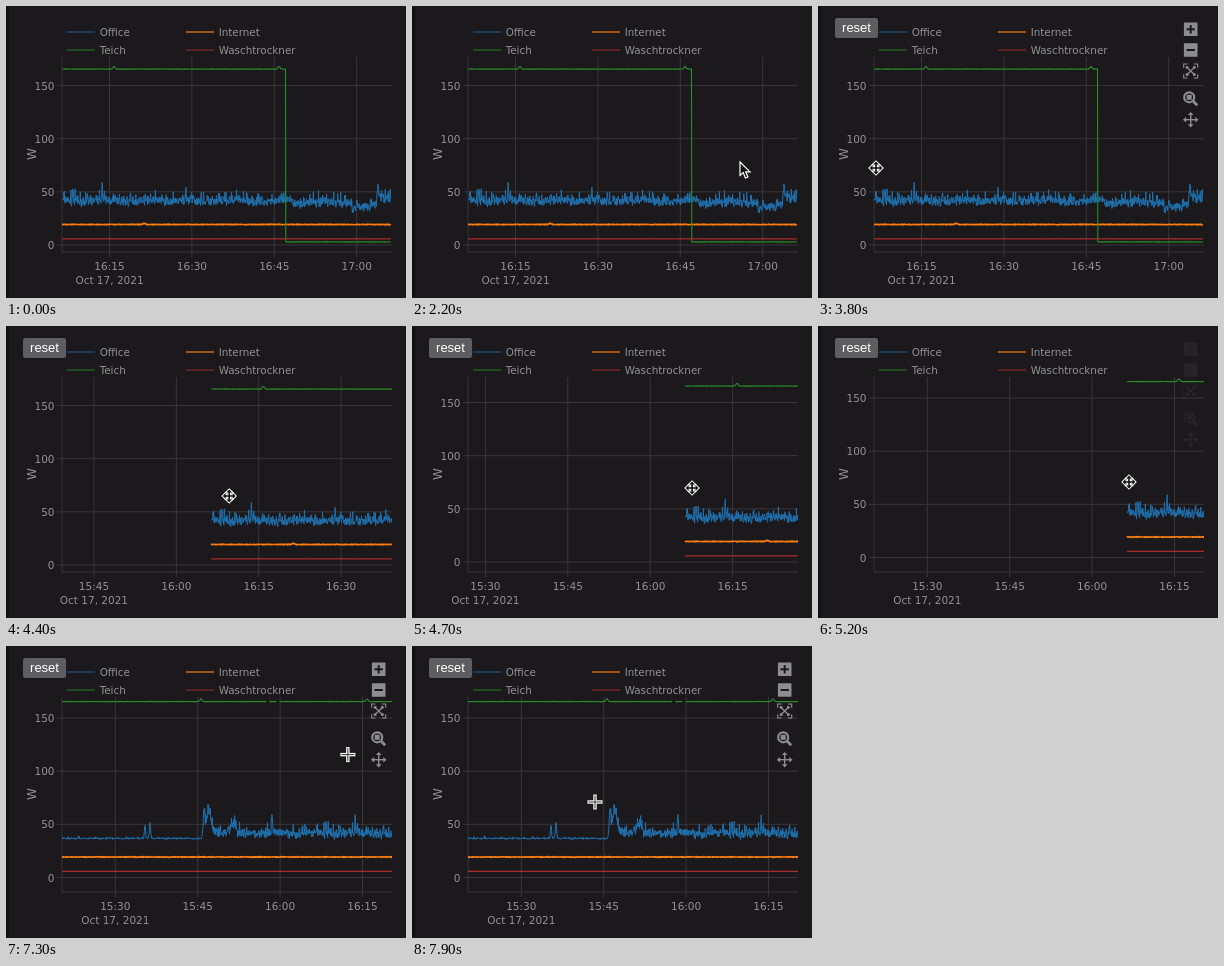
An HTML page with a canvas for the animation above (8 s loop, 400 by 292 pixels).

```html
<!DOCTYPE html>
<html lang="en">
<head>
<meta charset="utf-8">
<title>Power chart</title>
<style>
html, body { margin: 0; width: 100%; height: 100%; overflow: hidden; background: #1b191c; }
canvas { display: block; width: 400px; height: 292px; }
</style>
</head>
<body>
<canvas id="stage"></canvas>
<script>
const W = 400, H = 292, LOOP = 8000;
const BOX = { l: 56, t: 51, r: 386, b: 246 };
const FONT = '"DejaVu Sans", sans-serif';
const canvas = document.getElementById('stage');
const c = canvas.getContext('2d');
const dpr = window.devicePixelRatio || 1;
canvas.width = W * dpr;
canvas.height = H * dpr;

const PX_PER_W = 1.063, ZERO_Y = 239;
const QUARTER = 82.4, TICK_X = 103.5; // 16:15 sits at TICK_X before panning

// keys: [time, x, y]
const pointer = [
  [1100, 400, 190], [1500, 340, 165], [1800, 328, 156], [2250, 328, 156],
  [2550, 374, 111], [2900, 374, 111], [3500, 58, 162], [3850, 58, 162],
  [4150, 140, 167], [4400, 223, 170], [4700, 280, 162], [5050, 311, 156],
  [5700, 311, 156], [6250, 374, 99], [7200, 374, 99], [7800, 183, 156]
];
const drag = [[3900, 0, 0], [4150, 75, 2], [4400, 149, 0], [4700, 217, -3], [5100, 253, -7.5]];

function at(keys, t) {
  if (t <= keys[0][0]) return keys[0].slice(1);
  for (let i = 1; i < keys.length; i++) {
    const [t0, x0, y0] = keys[i - 1], [t1, x1, y1] = keys[i];
    if (t < t1) {
      const k = (t - t0) / (t1 - t0);
      return [x0 + (x1 - x0) * k, y0 + (y1 - y0) * k];
    }
  }
  return keys[keys.length - 1].slice(1);
}

const ramp = (t, from) => Math.min(1, Math.max(0, (t - from) / 300));

let seed = 7;
function rnd() {
  seed = (seed * 16807) % 2147483647;
  return seed / 2147483647;
}
const jitter = a => (rnd() + rnd() - 1) * a;

// [x, height, width]
const officePeaks = [
  [-114, 13, 0.8], [-109, 15, 0.9], [-55, 20, 1.3], [-50, 23, 3.2], [-26, 7, 3],
  [13, 17, 0.6], [67, 10, 0.6], [96, 14, 0.5], [180, 7, 0.7], [372, 9, 0.8]
];
const pondPeaks = [[-58, 2.5, 1.5], [108, 2.5, 1.5], [273, 2.5, 1.5]];
const peaks = (list, x) =>
  list.reduce((sum, [p, h, w]) => sum + h * Math.exp(-(((x - p) / w) ** 2)), 0);

function office(x) {
  const bump = peaks(officePeaks, x);
  if (x < -56) return 36.8 + bump + jitter(1.2) + (rnd() > 0.97 ? 1.5 : 0);
  let v = 41.5 + bump + jitter(5.5) + 0.8 * Math.sin(x / 7);
  if (rnd() > 0.85) v += 8 * rnd();
  if (x > 285) v -= 1.5;
  if (x > 346 && x < 369) v -= 4.5;
  if (x > 371) v += 4.5;
  return v;
}

function pond(x) {
  if ((x > 7.5 && x < 10.5) || (x > 17.5 && x < 20.5)) return null;
  return x < 279.7 ? 165.5 + peaks(pondPeaks, x) + jitter(0.3) : 2.9 + jitter(0.3);
}

const series = [
  { name: 'Office', color: '#1f70ad', width: 1, value: office, lx: 61, ly: 26 },
  { name: 'Internet', color: '#f97d10', width: 1.5, value: x => 19.3 + jitter(0.5) + peaks([[138, 1, 2]], x), lx: 180, ly: 26 },
  { name: 'Teich', color: '#298c29', width: 1.1, value: pond, lx: 61, ly: 44 },
  { name: 'Waschtrockner', color: '#a82c2d', width: 1.2, value: () => 5.8 + jitter(0.1), lx: 180, ly: 44 }
];

function trace(value, from, to) {
  const path = new Path2D();
  let pen = false;
  for (let x = from; x <= to; x += 0.3) {
    const v = value(x);
    if (v !== null) path[pen ? 'lineTo' : 'moveTo'](x, ZERO_Y - v * PX_PER_W);
    pen = v !== null;
  }
  return path;
}
for (const s of series) {
  s.recent = trace(s.value, 56, 385);
  s.older = trace(s.value, -198, 56.2);
}

function line(x0, y0, x1, y1, color, width = 1) {
  c.strokeStyle = color;
  c.lineWidth = width;
  c.beginPath();
  c.moveTo(x0, y0);
  c.lineTo(x1, y1);
  c.stroke();
}

function text(str, x, y, align = 'left', size = 10.5, color = '#929194', family = FONT) {
  c.font = `${size}px ${family}`;
  c.textAlign = align;
  c.fillStyle = color;
  c.fillText(str, x, y);
}

function panel(x, y, w, h, color, radius = 2.5) {
  c.fillStyle = color;
  c.beginPath();
  c.roundRect(x, y, w, h, radius);
  c.fill();
}

function drawAxes(dx, dy) {
  const grid = '#373538';
  for (let v = 0; v <= 150; v += 50) {
    const y = ZERO_Y - v * PX_PER_W + dy;
    line(51, y, BOX.r, y, grid);
    text(v, 48.5, y + 4, 'right');
  }
  let first = true;
  for (let i = -4; i <= 3; i++) {
    const x = TICK_X + i * QUARTER + dx;
    if (x < BOX.l || x > BOX.r) continue;
    const min = 975 + i * 15;
    line(x, BOX.t, x, BOX.b + 5, grid);
    text(Math.floor(min / 60) + ':' + String(min % 60).padStart(2, '0'), x, 264, 'center');
    if (first) text('Oct 17, 2021', x, 277.5, 'center');
    first = false;
  }
  line(BOX.l, BOX.t, BOX.l, BOX.b, grid);
  line(BOX.l, BOX.b, BOX.r, BOX.b, grid);
  c.save();
  c.translate(29.5, 148);
  c.rotate(-Math.PI / 2);
  text('W', 0, 0, 'center', 12);
  c.restore();
}

function drawTraces(dx, dy, loaded) {
  c.save();
  c.beginPath();
  c.rect(BOX.l, BOX.t, BOX.r - BOX.l, BOX.b - BOX.t);
  c.clip();
  c.translate(dx, dy);
  c.lineJoin = 'round';
  for (const s of series) {
    c.strokeStyle = s.color;
    c.lineWidth = s.width;
    if (loaded) c.stroke(s.older);
    c.stroke(s.recent);
  }
  c.restore();
}

function drawLegend() {
  for (const s of series) {
    c.globalAlpha = 0.8;
    line(s.lx, s.ly, s.lx + 28, s.ly, s.color, s.width);
    c.globalAlpha = 1;
    text(s.name, s.lx + 32.7, s.ly + 4, 'left', 10.35);
  }
}

const corners = [[-1, -1], [1, -1], [1, 1], [-1, 1]];
const sides = [0, 1, 2, 3].map(i => i * Math.PI / 2);

function drawTools(alpha) {
  if (!alpha) return;
  const ink = '#8d8c8f', x = 372.7;
  c.save();
  c.globalAlpha = alpha;
  for (const y of [23.3, 44]) {
    panel(x - 6.8, y - 6.8, 13.6, 13.6, ink, 0.5);
    line(x - 4.2, y, x + 4.2, y, '#1b191c', 2);
  }
  line(x, 19.1, x, 27.5, '#1b191c', 2);

  line(x - 4, 61, x + 4, 69, ink, 1.2);
  line(x - 4, 69, x + 4, 61, ink, 1.2);
  for (const [i, j] of corners) {
    panel(x + i * 3.6 - 1.3, 65 + j * 3.6 - 1.3, 2.6, 2.6, ink, 0);
    c.lineWidth = 1.1;
    c.beginPath();
    c.moveTo(x + i * 3.2, 65 + j * 7);
    c.lineTo(x + i * 7, 65 + j * 7);
    c.lineTo(x + i * 7, 65 + j * 3.2);
    c.stroke();
  }

  c.lineWidth = 2.2;
  c.beginPath();
  c.arc(x - 1.5, 91.3, 5, 0, 7);
  c.stroke();
  line(x + 2.5, 95.3, x + 6.5, 99.3, ink, 2.8);
  c.fillStyle = ink;
  c.fillRect(x - 4, 88.8, 5, 5);

  line(x - 6, 113.7, x + 6, 113.7, ink, 1.4);
  line(x, 107.7, x, 119.7, ink, 1.4);
  for (const a of sides) {
    c.save();
    c.translate(x, 113.7);
    c.rotate(a);
    c.beginPath();
    c.moveTo(0, -7.8);
    c.lineTo(2.8, -4.6);
    c.lineTo(-2.8, -4.6);
    c.fill();
    c.restore();
  }
  c.restore();
}

function drawTip(label, y) {
  c.font = `11px ${FONT}`;
  const w = c.measureText(label).width + 19;
  panel(356 - w, y - 13, w, 26, '#5b6680');
  c.beginPath();
  c.moveTo(356, y - 6);
  c.lineTo(363, y);
  c.lineTo(356, y + 6);
  c.fill();
  text(label, 356 - w / 2, y + 4, 'center', 11, '#fff');
}

const ARROW = new Path2D('M0 0V13.5L3.2 10.6L5.4 16L7.9 15L5.7 9.8H10Z');
const HAND = new Path2D('M-1.6 1.2Q-1.5 -.3 0 -.2Q1.3 0 1.4 1.4L2 5Q4 4 4.7 5.6Q6.3 5 7 6.4Q9 6 9.2 8.2L8.7 12L7.4 16H-.2L-2.5 12.5L-5 9.5Q-5 7.6 -3.2 8.2L-.8 9.8Z');
const SPOKE = new Path2D('M0 -6.4L2.9 -3.5H.8V0H-.8V-3.5H-2.9Z');

function spokes(paint) {
  for (const a of sides) {
    c.save();
    c.rotate(a);
    paint();
    c.restore();
  }
}

const cursors = {
  arrow() {
    c.fillStyle = '#111';
    c.strokeStyle = '#fff';
    c.lineWidth = 1.2;
    c.fill(ARROW);
    c.stroke(ARROW);
  },
  hand() {
    c.strokeStyle = '#111';
    c.fillStyle = '#fff';
    c.lineWidth = 1.6;
    c.stroke(HAND);
    c.fill(HAND);
    for (const x of [2.2, 4.4, 6.6]) line(x, 10, x + 0.2, 13.5, '#222', 0.8);
  },
  cross() {
    line(-7.5, 0, 7.5, 0, '#fff', 3.4);
    line(0, -7.5, 0, 7.5, '#fff', 3.4);
    line(-6.5, 0, 6.5, 0, '#333', 1);
    line(0, -6.5, 0, 6.5, '#333', 1);
  },
  move() {
    c.strokeStyle = '#fff';
    c.fillStyle = '#111';
    c.lineWidth = 2;
    spokes(() => c.stroke(SPOKE));
    spokes(() => c.fill(SPOKE));
  }
};

function cursorKind(t, x) {
  if (t < 2250) return 'arrow';
  if (x > 362) return 'hand';
  return t < 2700 || t > 6500 ? 'cross' : 'move';
}

function draw(t) {
  const [dx, dy] = at(drag, t);
  const [x, y] = at(pointer, t);
  const kind = cursorKind(t, x);

  c.setTransform(dpr, 0, 0, dpr, 0, 0);
  c.fillStyle = '#1b191c';
  c.fillRect(0, 0, W, H);
  c.fillStyle = '#111012';
  c.fillRect(0, 0, 3, H);

  drawAxes(dx, dy);
  drawTraces(dx, dy, t >= 5700);
  drawLegend();
  drawTools(t < 3850 ? ramp(t, 2250) : t < 5000 ? 1 - ramp(t, 3850) : ramp(t, 5170));

  if (t >= 2750) {
    panel(17, 12, 43, 20, '#5e5d5f');
    text('reset', 38.5, 26.3, 'center', 13, '#fff', '"Liberation Sans", Arial, sans-serif');
  }
  if (kind === 'hand') {
    if (t < 5000) drawTip('Pan', 118);
    else drawTip('Zoom', 97);
  }
  if (t >= 1100) {
    c.save();
    c.translate(x, y);
    cursors[kind]();
    c.restore();
  }
}

const start = performance.now();
function tick() {
  draw((performance.now() - start) % LOOP);
  requestAnimationFrame(tick);
}
tick();
</script>
</body>
</html>
```
